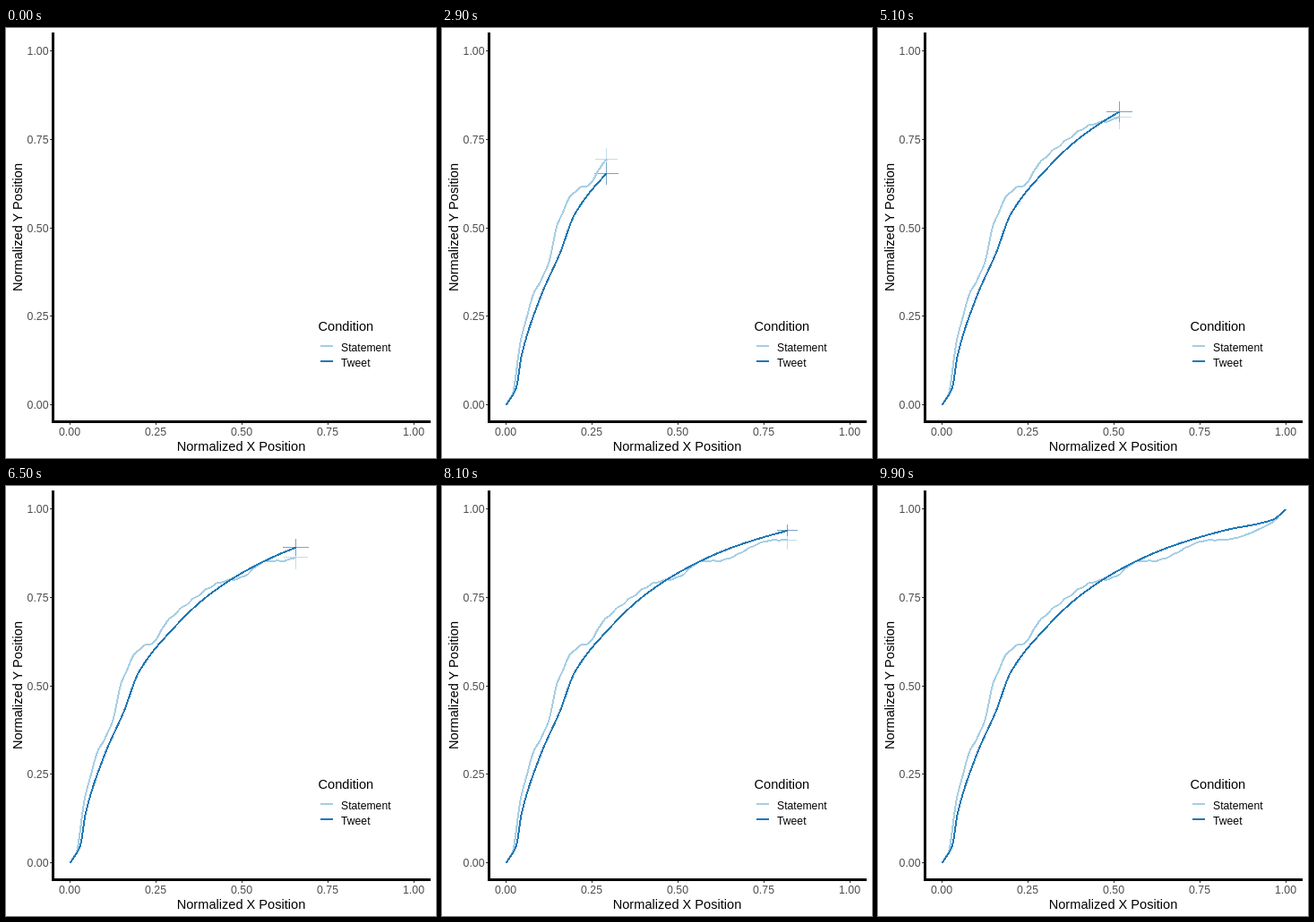
These frames come from a looping animation (480 by 480 pixels, 10000 ms). An HTML page:

```html
<!DOCTYPE html>
<html lang="en">
<head>
<meta charset="utf-8">
<title>Normalized trajectories</title>
<style>
  html, body { margin: 0; width: 100%; height: 100%; overflow: hidden; background: #fff; }
  svg { display: block; width: 480px; height: 480px; font-family: "Liberation Sans", Arial, sans-serif; }
  path { fill: none; shape-rendering: crispEdges; }
  .title { font-size: 14.6px; }
  .tick { font-size: 12.3px; fill: #4d4d4d; }
  .item { font-size: 12.2px; }
  .mid { text-anchor: middle; }
  .end { text-anchor: end; }
  .axis { stroke: #000; stroke-width: 3; }
  .marks { stroke: #333; }
  .curve { stroke-width: 2; stroke-linejoin: round; }
  .pale { stroke: #a6cee3; }
  .deep { stroke: #1f78b4; }
  .cross.pale { stroke: #c3deec; }
  .cross.deep { stroke: #7ba3bf; }
</style>
</head>
<body>
<svg viewBox="0 0 480 480">
  <path class="axis" d="M52.5 5V440M51 439.5H474"/>
  <path class="marks" id="marks"/>
  <g id="labels"></g>
  <text class="title mid" x="262.5" y="472">Normalized X Position</text>
  <text class="title mid" transform="translate(18 222.5) rotate(-90)">Normalized Y Position</text>
  <text class="title" x="348.5" y="338">Condition</text>
  <path class="curve pale" d="M351 355H365"/>
  <path class="curve deep" d="M351 372H365"/>
  <text class="item" x="374" y="360.5">Statement</text>
  <text class="item" x="374" y="377.5">Tweet</text>
  <g id="plot"></g>
</svg>
<script>
const NS = 'http://www.w3.org/2000/svg';
const STEPS = 100, STEP_MS = 100;
const px = u => 71.5 + 384 * u;
const py = v => 421 - 395 * v;

function add(parent, tag, attrs, text = '') {
  const el = document.createElementNS(NS, tag);
  for (const name in attrs) el.setAttribute(name, attrs[name]);
  el.textContent = text;
  return document.getElementById(parent).appendChild(el);
}

// Axis ticks and their labels
let marks = '';
for (let i = 0; i <= 4; i++) {
  const x = 71 + i * 96, y = Math.floor(420.5 - i * 98.75);
  const text = (i / 4).toFixed(2);
  marks += `M${x + .5} 441v2M49 ${y + .5}h2`;
  add('labels', 'text', { class: 'tick mid', x, y: 455 }, text);
  add('labels', 'text', { class: 'tick end', x: 47.5, y: y + 5.2 }, text);
}
document.getElementById('marks').setAttribute('d', marks);

// Smooth curve through knots that never overshoots them
function spline(knots) {
  const last = knots.length - 1;
  const slope = i => (knots[i + 1][1] - knots[i][1]) / (knots[i + 1][0] - knots[i][0]);
  const tangent = i => {
    const a = slope(Math.max(0, i - 1)), b = slope(Math.min(last - 1, i));
    return a * b > 0 ? 2 * a * b / (a + b) : 0;
  };
  return u => {
    const i = Math.max(1, knots.findIndex(k => k[0] >= u)) - 1;
    const [x0, y0] = knots[i], [x1, y1] = knots[i + 1];
    const w = x1 - x0, t = (u - x0) / w, s = 1 - t;
    return s * s * (1 + 2 * t) * y0 + t * t * (3 - 2 * t) * y1
      + w * t * s * (s * tangent(i) - t * tangent(i + 1));
  };
}

const rough = spline([
  [0, 0], [.018, .03], [.042, .176], [.081, .315], [.12, .39], [.15, .51],
  [.2, .604], [.25, .63], [.27, .668], [.35, .74], [.435, .793], [.5, .808],
  [.57, .853], [.615, .854], [.77, .912], [.823, .914], [.955, .96], [1, 1]
]);
const smooth = spline([
  [0, 0], [.03, .05], [.045, .14], [.1, .305], [.157, .43], [.2, .54],
  [.3, .663], [.4, .755], [.52, .831], [.66, .893], [.82, .94], [.96, .97], [1, 1]
]);
const ripple = u => .003 * (1 - u) * Math.sin(180 * u);

const series = [
  { tone: 'pale', f: u => rough(u) + ripple(u), wide: 14, tall: 14, taper: 0 },
  { tone: 'deep', f: smooth, wide: 15, tall: 16, taper: .6 }
];
for (const s of series) s.cross = add('plot', 'path', { class: 'cross ' + s.tone });
for (const s of series) s.curve = add('plot', 'path', { class: 'curve ' + s.tone });

function draw(step) {
  const end = step / (STEPS - 1);
  const arch = Math.sqrt(4 * end * (1 - end));
  for (const s of series) {
    let d = `M${px(0)} ${py(0)}`;
    for (let i = 1; i <= 4 * step; i++) {
      const u = end * i / (4 * step);
      d += `L${px(u).toFixed(2)} ${py(s.f(u)).toFixed(2)}`;
    }
    s.curve.setAttribute('d', step ? d : '');

    const w = s.wide * arch, h = s.tall * arch * (1 - s.taper * end);
    const x = Math.floor(px(end)) + .5, y = Math.floor(py(s.f(end))) + .5;
    s.cross.setAttribute('d', arch ? `M${x - w} ${y}h${2 * w}M${x} ${y - h}v${2 * h}` : '');
  }
}

const start = performance.now();
function tick() {
  const t = Math.max(0, performance.now() - start);
  draw(Math.floor(t / STEP_MS) % STEPS);
  requestAnimationFrame(tick);
}
tick();
</script>
</body>
</html>
```
